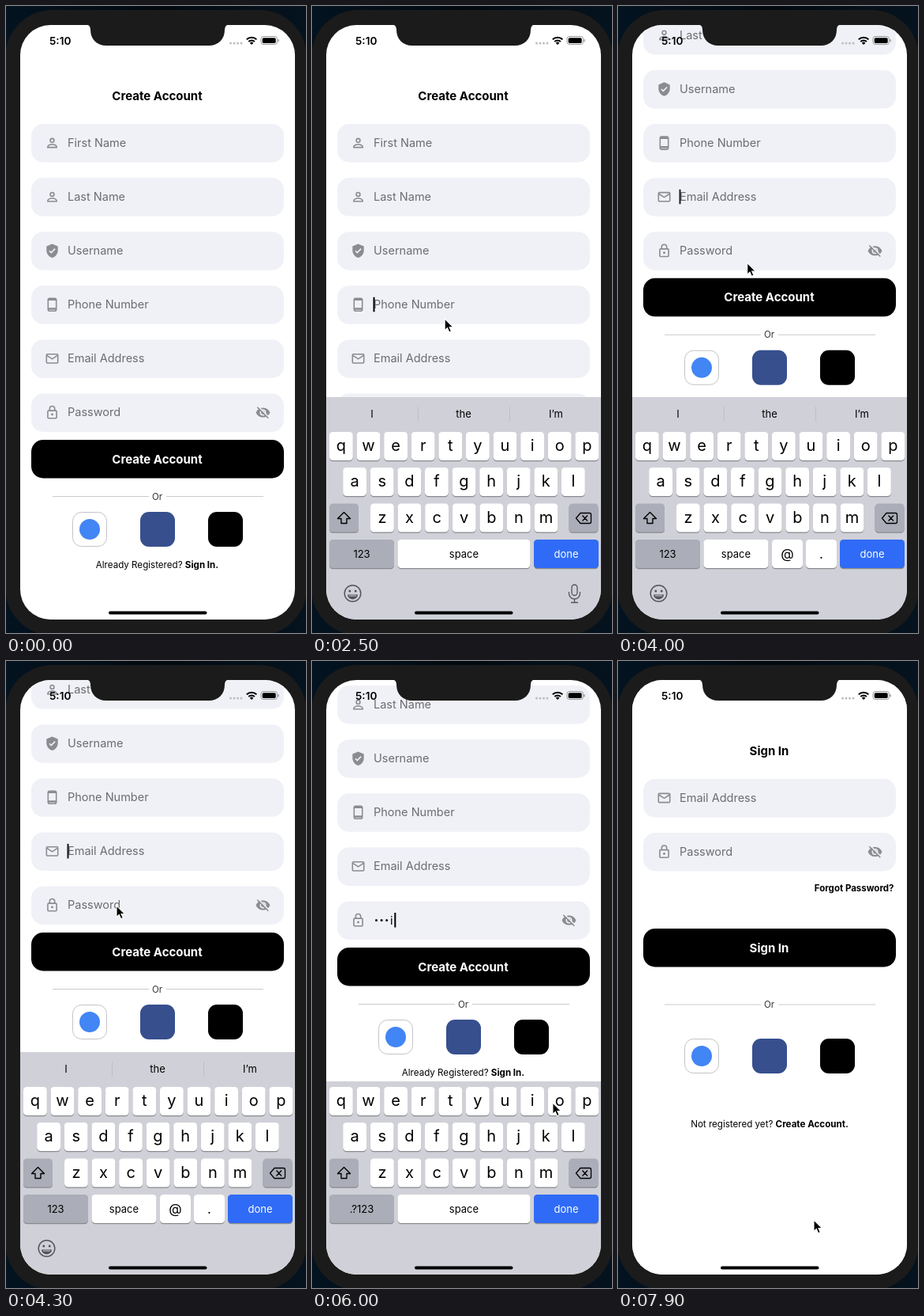
These frames come from a looping animation (380 by 792 pixels, 8000 ms). An HTML page:

```html
<!DOCTYPE html>
<html lang="en">
<head>
<meta charset="utf-8">
<title>Create Account</title>
<style>
  html, body { margin: 0; width: 100%; height: 100%; overflow: hidden; background: #04101a; }
  svg { display: block; width: 100vw; height: 100vh; font-family: Inter, "Open Sans", sans-serif; }
</style>
</head>
<body>
<svg id="stage" viewBox="0 0 380 792"></svg>
<script>
const LOOP = 8000, STEP = 100;
const FIELD = '#f0f1f7', GREY = '#8b8b90', BEZEL = '#1b1b1b';

// Markup helpers
const rect = (x, y, w, h, r, fill, extra = '') =>
  `<rect x="${x}" y="${y}" width="${w}" height="${h}" rx="${r}" fill="${fill}" ${extra}/>`;
const text = (x, y, size, str, extra = '') =>
  `<text x="${x}" y="${y}" font-size="${size}" ${extra}>${str}</text>`;
const line = (d, color, width, extra = '') =>
  `<path d="${d}" fill="none" stroke="${color}" stroke-width="${width}" ${extra}/>`;
const MID = 'text-anchor="middle"';

// Field icons on a 24 unit grid
const icons = {
  person: `<circle cx="12" cy="8" r="3"/><path d="M5 19v-1c0-2.4 4.6-3.9 7-3.9s7 1.5 7 3.9v1z"/>`,
  shield: `<path d="M12 1L3 5v6c0 5.6 3.8 10.700 9 12 5.200-1.300 9-6.400 9-12V5z" fill="${GREY}" stroke="none"/>
    <path d="M7.500 12l3 3 6-6.200" stroke="${FIELD}"/>`,
  phone: `<rect x="5.500" y="2" width="13" height="20" rx="2.500"/><path d="M5.500 4h13M5.500 18.500h13" stroke-width="3"/>`,
  mail: `<rect x="3" y="5" width="18" height="14" rx="1.500"/><path d="M3.500 7l8.500 5.500L20.500 7"/>`,
  lock: `<rect x="5" y="9" width="14" height="12" rx="1.500"/><path d="M8 9V6a4 4 0 0 1 8 0v3"/>
    <circle cx="12" cy="15" r="1.800" fill="${GREY}" stroke="none"/>`,
  eye: `<path d="M1 12C4.500 2 19.500 2 23 12 19.500 22 4.500 22 1 12z" fill="${GREY}" stroke="none"/>
    <circle cx="12" cy="12" r="4" fill="${GREY}" stroke="${FIELD}"/>
    <path d="M5 3l17 17" stroke="${FIELD}"/><path d="M3 3.500L20.500 21"/>`
};
const icon = (name, cx, cy, s = 0.8) =>
  `<g transform="translate(${cx - 12 * s} ${cy - 12 * s}) scale(${s})" fill="none" stroke="${GREY}" stroke-width="2">${icons[name]}</g>`;

const field = (y, name, label, id = '') => rect(32, y, 320, 48.5, 15, FIELD) +
  icon(name, 58.5, y + 24) + text(78, y + 28.7, 14.5, label, `fill="#6c6c70" ${id}`) +
  (label === 'Password' ? icon('eye', 325.5, y + 24) : '');
const heading = str => text(191.5, 119, 15, str, `${MID} font-weight="700"`);
const button = (y, str) => rect(32, y, 320, 48.5, 15, '#000') +
  text(191.5, y + 29.5, 15, str, `${MID} font-weight="700" fill="#fff"`);
const divider = y => line(`M59 ${y}H181M203 ${y}H326`, '#cbcbcd', 1) +
  text(191.5, y + 4, 11.5, 'Or', `${MID} fill="#333"`);
const socials = y => rect(84.5, y + .5, 43, 43, 11, '#fff', 'stroke="#c4c4c8"') +
  `<circle cx="106" cy="${y + 22}" r="13" fill="#4285f4"/>` +
  rect(170, y, 44, 44, 11, '#374f8d') + rect(256, y, 44, 44, 11, '#000');
const footer = (x, y, question, action) =>
  text(x, y, 11.6, `${question} <tspan font-weight="700">${action}</tspan>`, MID);

const signUp = heading('Create Account') +
  [['person', 'First Name'], ['person', 'Last Name'], ['shield', 'Username'],
   ['phone', 'Phone Number'], ['mail', 'Email Address'], ['lock', 'Password', 'id="hint"']]
    .map(([name, label, id], i) => field(149 + i * 68.1, name, label, id)).join('') +
  button(548, 'Create Account') + divider(619.5) + socials(639) +
  footer(191.5, 710, 'Already Registered?', 'Sign In.') +
  `<g id="typed"></g><rect id="caret" width="2" height="18.500"/>`;

const signIn = rect(18, 24, 348, 752, 0, '#fff') + heading('Sign In') +
  field(149, 'mail', 'Email Address') + field(217, 'lock', 'Password') +
  text(349.5, 291, 11.5, 'Forgot Password?', 'text-anchor="end" font-weight="700"') +
  button(338, 'Sign In') + divider(434) + socials(477) +
  footer(192, 589, 'Not registered yet?', 'Create Account.');

// Keyboard
const key = (x, y, w, label = '', size = 20, fill = '#fff', color = '#000') =>
  rect(x, y + 1.2, w, 36, 4.5, '#898a8f') + rect(x, y, w, 36, 4.5, fill) +
  text(x + w / 2, y + (size > 15 ? 24 : 22.5), size, label, `${MID} fill="${color}"`);
const letters = (str, x, y) => [...str].map((c, i) => key(x + i * 34.6, y, 29.8, c)).join('');
const DARK = '#abadb8';
const keys = letters('qwertyuiop', 22, 538) + letters('asdfghjkl', 39.2, 583) +
  letters('zxcvbnm', 74, 628.5) + key(22, 628.5, 37, '', 13, DARK) + key(325.5, 628.5, 37, '', 13, DARK) +
  line('M40.500 639.500l-8 8h4.500v6h7v-6h4.500z', '#000', 1.4, 'stroke-linejoin="round"') +
  line('M340 640.500h11.500q2 0 2 2v9q0 2-2 2H340l-5.500-6.500zM342.500 643.500l6.500 7m0-7l-6.500 7', '#000', 1.3, 'stroke-linejoin="round"') +
  key(281, 674, 82, 'done', 13, '#2f6bf6', '#fff');
const suggestions = text(76, 520, 13, 'I', MID) + text(192, 520, 13, 'the', MID) +
  text(309, 520, 13, 'I’m', MID) + line('M134.500 506v19M250.500 506v19', '#bfc0c7', 1);
const smiley = `<circle cx="51.500" cy="742" r="10.300" fill="none" stroke="#55565b" stroke-width="1.500"/>
  <circle cx="47.800" cy="739" r="1.500" fill="#55565b"/><circle cx="55.200" cy="739" r="1.500" fill="#55565b"/>
  <path d="M45 743.500h13a6.500 6 0 0 1-13 0z" fill="#55565b"/><path d="M47 745h9" stroke="#d0d1d8"/>`;
const mic = rect(329, 731, 7, 13.5, 3.5, 'none', 'stroke="#55565b" stroke-width="1.300"') +
  line('M325.500 740v2a7 7 0 0 0 14 0v-2M332.500 749v4.500M328 753.500h9', '#55565b', 1.3);
const mode = label => key(22, 674, 82, label, 13, DARK);
const wideSpace = key(108.5, 674, 168, 'space', 13);
const layouts = {
  plain: suggestions + mode('123') + wideSpace + smiley + mic,
  email: suggestions + mode('123') + key(108.5, 674, 82, 'space', 13) +
    key(195, 674, 39, '@', 17) + key(238, 674, 39, '.', 17) + smiley,
  secret: mode('.?123') + wideSpace
};

const statusBar = text(55, 48.7, 13.6, '5:10', 'font-weight="600"') +
  [284.5, 289, 293.5, 298].map(x => `<circle cx="${x}" cy="47" r="1.500" fill="#bdbdbf"/>`).join('') +
  line('M304.800 42.300a9 9 0 0 1 12.600 0M307.300 45a5.400 5.400 0 0 1 7.600 0', '#000', 2) +
  `<path d="M308.800 46.800a3.200 3.200 0 0 1 4.600 0l-2.300 2.300z"/>` +
  rect(323, 38.5, 20.5, 10, 3, 'none', 'stroke="#999"') + rect(324.7, 40.2, 17, 6.7, 1.6, '#000') +
  rect(344.5, 42, 1.3, 3.4, .6, '#999');

document.getElementById('stage').innerHTML = `
  <defs><clipPath id="screen">${rect(18, 24, 348, 751, 38, '#000')}</clipPath>
  <linearGradient id="sky"><stop stop-color="#031320"/><stop offset=".5" stop-color="#02090f"/><stop offset="1" stop-color="#05131f"/></linearGradient></defs>
  ${rect(0, 0, 380, 792, 0, 'url(#sky)')}
  ${rect(-1, 5, 382, 790, 60, BEZEL)}
  <g clip-path="url(#screen)">
    ${rect(18, 24, 348, 752, 0, '#fff')}
    <g id="form">${signUp}</g>
    <g id="login">${signIn}</g>
    <g id="keyboard"><rect id="panel" x="18" width="348" height="300" fill="#d0d1d8"/>${keys}
      ${Object.entries(layouts).map(([id, body]) => `<g id="${id}">${body}</g>`).join('')}</g>
    ${statusBar}
  </g>
  <path d="M101 23q6 1 6 7c0 12 8 20 20 20h130c12 0 20-8 20-20q0-6 6-7z" fill="${BEZEL}"/>
  ${rect(130, 764.5, 124.5, 4, 2, '#000')}
  <path id="pointer" d="M0 0v14.500l3.300-3 2.300 5.300 2.700-1.200-2.300-5h4.600z" stroke="#fff" stroke-width="1.100"/>`;

// Motion
const $ = id => document.getElementById(id);
const clamp = v => Math.max(0, Math.min(1, v));
const progress = (t, a, b) => clamp((t - a) / (b - a));
const ease = p => p < .5 ? 4 * p ** 3 : 1 - (2 - 2 * p) ** 3 / 2;
const easeOut = p => 1 - (1 - p) ** 3;
const move = (id, x, y) => $(id).setAttribute('transform', `translate(${x} ${y})`);
const show = (id, on) => $(id).setAttribute('display', on ? 'inline' : 'none');

// time, x, y of the pointer tip
const route = [
  [100, 372, 330], [400, 106, 170], [1050, 106, 170], [1350, 122, 240], [1500, 124, 242],
  [1800, 142, 308], [1950, 144, 310], [2250, 162, 376], [2400, 164, 378], [2700, 180, 444],
  [2900, 180, 446], [3300, 187, 465], [3550, 187, 465], [3900, 172, 330], [4200, 140, 309],
  [4400, 140, 309], [4850, 176, 560], [5000, 180, 560], [5100, 213, 559], [5250, 213, 559],
  [5450, 245, 558], [5600, 245, 558], [5750, 279, 558], [5900, 279, 558], [6050, 314, 558],
  [6200, 314, 558], [6700, 330, 706], [7050, 330, 706], [7450, 248, 706]
];
// focus time and field row
const focuses = [[450, 0], [1400, 1], [1850, 2], [2300, 3], [2780, 4], [4450, 5]];
const strokes = [[5050, 't'], [5250, 'y'], [5550, 'u'], [5850, 'i'], [6150, 'o']];

function pointerAt(t) {
  const i = route.findIndex(p => p[0] > t);
  if (i < 0) return route[route.length - 1].slice(1);
  const [t0, x0, y0] = route[i - 1], [t1, x1, y1] = route[i];
  const p = progress(t, t0, t1), e = p * p * (3 - 2 * p);
  return [x0 + (x1 - x0) * e, y0 + (y1 - y0) * e];
}

function blink(age) {
  const p = age % 1000;
  if (age < 500) return 1;
  return p < 500 ? clamp(p / 250) : clamp((750 - p) / 250);
}

function drawCaret(t) {
  const focus = focuses.filter(f => f[0] <= t).pop();
  const typed = strokes.filter(s => s[0] <= t);
  const last = typed[typed.length - 1];
  const visible = focus && t < 7050;
  show('caret', visible);
  $('hint').setAttribute('opacity', 1 - progress(t, 5050, 5250));
  $('typed').innerHTML = typed.map(([at, c], i) =>
    i === typed.length - 1 && t - at < 400
      ? text(78.5 + i * 6.8, 518.5, 14.5, c)
      : `<circle cx="${81.5 + i * 6.6}" cy="513.500" r="1.500"/>`).join('');
  if (!visible) return;
  const caret = $('caret');
  caret.setAttribute('x', typed.length ? 77.7 + typed.length * 6.8 - (typed.length - 1) * .2 : 77.5);
  caret.setAttribute('y', 163.5 + focus[1] * 68.1);
  caret.setAttribute('opacity', last ? (t >= 6900 ? 1 : blink(t - last[0])) : blink(t - focus[0]));
}

function draw(t) {
  const scroll = 205 * ease(progress(t, 3550, 4050)) - 19 * easeOut(progress(t, 4450, 4750)) -
    186 * ease(progress(t, 7000, 7350));
  move('form', 0, -scroll);
  drawCaret(t);

  const layout = t < 2800 ? 'plain' : t < 4500 ? 'email' : 'secret';
  Object.keys(layouts).forEach(id => show(id, id === layout));
  $('panel').setAttribute('y', 494 + 37 * easeOut(progress(t, 4450, 4750)));
  move('keyboard', 0, 281 * (1 - easeOut(progress(t, 450, 800))) + 244 * ease(progress(t, 6920, 7400)));
  show('keyboard', t > 450 && t < 7400);

  show('login', t >= 7550);
  move('login', 348 * (1 - easeOut(progress(t, 7500, 7850))), 0);

  show('pointer', t >= 100);
  if (t >= 100) move('pointer', ...pointerAt(t));
}

const start = performance.now();
function tick(now) {
  const t = Math.max(0, now - start) % LOOP;
  draw(Math.floor(t / STEP) * STEP);
  requestAnimationFrame(tick);
}
draw(0);
requestAnimationFrame(tick);
</script>
</body>
</html>
```
